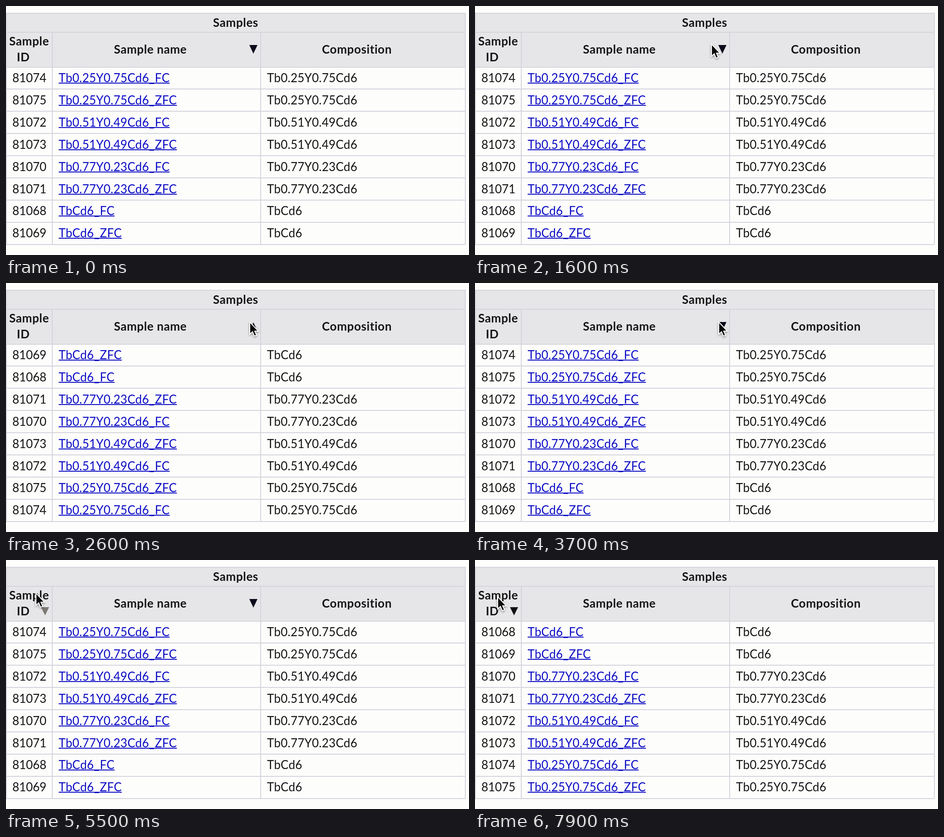
An HTML page for the animation above (8000 ms loop, 1020 px wide and 549 px high).

```html
<!DOCTYPE html>
<html lang="en">
<head>
<meta charset="utf-8">
<title>Samples</title>
<style>
html, body { margin: 0; width: 100%; height: 100%; overflow: hidden; background: #fdfdfc; }
#stage { position: relative; width: 1020px; height: 549px; overflow: hidden;
  font: 26px/40px Lato, "Open Sans", sans-serif; letter-spacing: .25px; color: #141414; }
#stage div, svg { position: absolute; }
.head { left: 0; top: 16px; width: 1012px; height: 118px; background: #e6e6e9; }
.line { background: #d4d4dc; }
.title { font-weight: 700; letter-spacing: .6px; white-space: nowrap; transform: translateX(-50%); }
.row { left: 0; top: 138px; width: 1012px; height: 40px; white-space: nowrap; }
.id { letter-spacing: -.1px; }
.link { color: #0c0cc4; text-decoration: underline 2px; text-underline-offset: 1px;
  text-decoration-skip-ink: none; }
.link span { letter-spacing: 1.2px; }
svg { left: 0; top: 0; }
</style>
</head>
<body>
<div id="stage"></div>
<script>
const LOOP = 8000, PITCH = 48.9;
const stage = document.getElementById('stage');

function box(parent, cls, x, y, html = '', w, h) {
  const el = document.createElement('div');
  el.className = cls;
  el.style.left = x + 'px';
  el.style.top = y + 'px';
  if (w) { el.style.width = w + 'px'; el.style.height = h + 'px'; }
  el.innerHTML = html;
  parent.append(el);
  return el;
}

// Table grid and headings
box(stage, 'head', 0, 16);
for (const y of [15, 57]) box(stage, 'line', 0, y, '', 1012, 1.5);
for (let i = 0; i < 9; i++) box(stage, 'line', 0, Math.round(133.5 + i * PITCH), '', 1012, 1.5);
for (const [x, y] of [[0, 15], [101, 57], [560, 57], [1011, 15]])
  box(stage, 'line', x, y, '', 1.5, 526 - y);
for (const [text, x, y] of [['Samples', 506, 16], ['Sample', 51, 57], ['ID', 38, 92],
  ['Sample name', 318, 75], ['Composition', 773, 75]]) box(stage, 'title', x, y, text);

// Rows, listed by ascending sample ID
const mixes = ['TbCd6', 'Tb0.77Y0.23Cd6', 'Tb0.51Y0.49Cd6', 'Tb0.25Y0.75Cd6'];
const rows = Array.from({ length: 8 }, (_, i) => {
  const mix = mixes[i >> 1], row = box(stage, 'row', 0, 138);
  box(row, 'id', 14, 0, 81068 + i);
  box(row, 'link', 116, 0, mix + '<span>_</span>' + (i % 2 ? 'ZFC' : 'FC'));
  box(row, '', 575, 0, mix);
  return row;
});

stage.insertAdjacentHTML('beforeend', `<svg width="1020" height="549">
  <path id="nameMark" fill="#0b0b1c"/>
  <path id="idMark" d="M77 104h18l-9 18z"/>
  <path id="cursor" d="M0 0V27L6 21.5L10 31L15 29L11 20H19Z" fill="#080808" stroke="#fff"
    stroke-width="2" style="filter:drop-shadow(0 2px 2px #0006)"/>
</svg>`);
const [nameMark, idMark, cursor] = stage.querySelectorAll('path');

// Position of a row for each sort order
const orders = {
  nameUp: i => 6 - (i & 6) + (i & 1),
  nameDown: i => 7 - orders.nameUp(i),
  id: i => i
};

// Cursor stops: time, x, y
const stops = [[1000, 590, 190], [1600, 521, 84], [1900, 537, 86], [4300, 537, 86],
  [5200, 66, 73], [6100, 66, 73], [6500, 62, 97], [7300, 62, 97], [7800, 50, 81], [LOOP, 50, 81]];

function cursorAt(t) {
  const k = Math.max(1, stops.findIndex(s => s[0] > t));
  const [t0, x0, y0] = stops[k - 1], [t1, x1, y1] = stops[k];
  const p = Math.max(0, (t - t0) / (t1 - t0)), e = p * p * (3 - 2 * p);
  return [x0 + (x1 - x0) * e, y0 + (y1 - y0) * e];
}

function draw(now) {
  const t = Math.floor(now % LOOP / 100) * 100;
  const sort = t >= 7100 ? 'id' : t >= 2300 && t < 3200 ? 'nameDown' : 'nameUp';
  rows.forEach((row, i) => {
    row.style.transform = `translateY(${Math.round(orders[sort](i) * PITCH)}px)`;
  });

  const [x, y] = cursorAt(t);
  cursor.setAttribute('transform', `translate(${x} ${y})`);
  cursor.style.display = t < stops[0][0] ? 'none' : '';

  nameMark.style.display = sort === 'id' ? 'none' : '';
  nameMark.setAttribute('d', sort === 'nameDown' ? 'M536 105h18l-9 -18z' : 'M536 86h18l-9 19z');
  idMark.style.display = sort === 'id' || x < 101 ? '' : 'none';
  idMark.setAttribute('fill', sort === 'id' ? '#101010' : '#7c7974');
  requestAnimationFrame(draw);
}
draw(performance.now());
</script>
</body>
</html>
```
